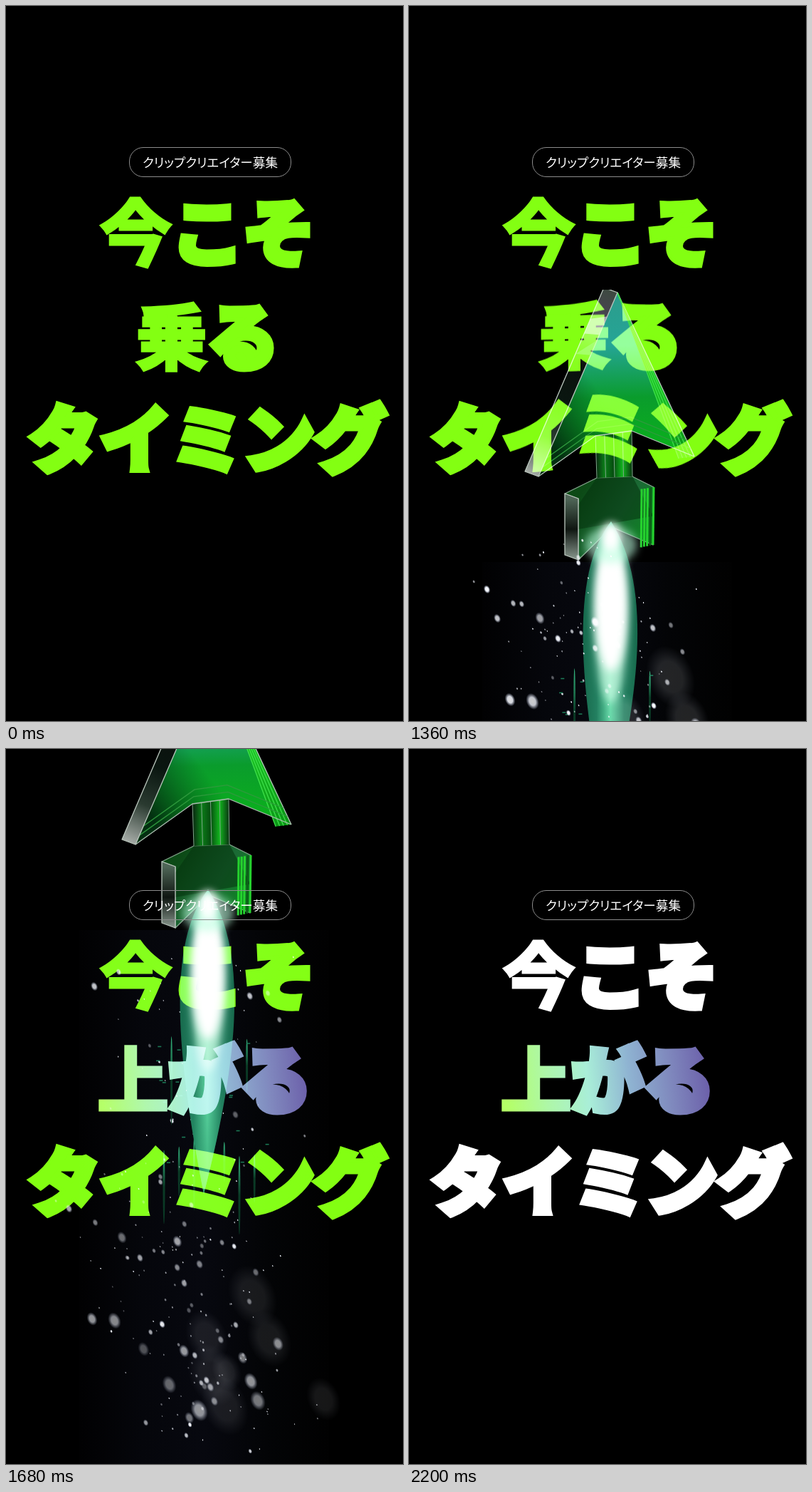
Animation, 558 px wide and 1003 px high, one loop 7200 ms. Source, as an HTML page with a canvas:

```html
<!DOCTYPE html>
<html lang="ja">
<head>
<meta charset="utf-8">
<style>
html, body { margin: 0; width: 100%; height: 100%; overflow: hidden; background: #000; }
canvas { display: block; }
#pill {
  position: absolute; left: 173px; top: 198px; width: 228px; height: 42px;
  box-sizing: border-box; border: 1px solid #8c8c8c; border-radius: 20px;
  color: #fff; font: 500 17.6px/40px "Noto Sans CJK JP", "Noto Sans CJK", sans-serif;
  font-feature-settings: "palt"; text-align: center; white-space: nowrap;
}
</style>
</head>
<body>
<canvas id="stage" width="558" height="1003"></canvas>
<div id="pill">クリップクリエイター募集</div>
<script>
const W = 558, H = 1003, LOOP = 7200, STEP = 40;
const LIME = [131, 255, 18];
const stage = document.getElementById('stage').getContext('2d');
const clamp = v => Math.max(0, Math.min(1, v));
const bell = v => Math.exp(-v * v);

function layer(w, h) {
  const c = document.createElement('canvas');
  c.width = w;
  c.height = h;
  return c.getContext('2d');
}

let seed = 41;
function rnd() {
  seed = (seed * 16807) % 2147483647;
  return seed / 2147483647;
}
const spread = () => rnd() + rnd() + rnd() - 1.5;

function ramp(c, [x0, y0], [x1, y1], ...colors) {
  const g = c.createLinearGradient(x0, y0, x1, y1);
  colors.forEach((col, i) => g.addColorStop(i / (colors.length - 1), col));
  return g;
}

// points are [x, y] pairs
const mix = (a, b, k) => a.map((v, i) => v + (b[i] - v) * k);

function shape(c, pts, fill, line, width = 1) {
  c.beginPath();
  pts.forEach(p => c.lineTo(...p));
  if (fill) {
    c.closePath();
    c.fillStyle = fill;
    c.fill();
  }
  if (line) {
    c.strokeStyle = line;
    c.lineWidth = width;
    c.stroke();
  }
}

function star(c, { x, y, r, alpha }) {
  c.save();
  c.translate(x, y);
  c.rotate(-0.4);
  c.scale(r, r * 1.4);
  const g = c.createRadialGradient(0, 0, 0, 0, 0, 1.4);
  g.addColorStop(0, '#fff');
  g.addColorStop(0.5, '#f4f7ff');
  g.addColorStop(1, 'rgba(200,210,235,0)');
  c.globalAlpha *= alpha;
  c.fillStyle = g;
  c.fillRect(-2, -2, 4, 4);
  c.restore();
}

function drawSky(c) {
  c.fillStyle = ramp(c, [103, 0], [454, 0], '#010102', '#05060b', '#07080f', '#030406', '#010101');
  c.beginPath();
  c.moveTo(103, 382);
  c.lineTo(454, 382);
  c.lineTo(454, 1284);
  c.quadraticCurveTo(290, 1170, 210, 1255);
  c.quadraticCurveTo(150, 1255, 103, 1280);
  c.fill();
  for (let i = 0; i < 150; i++) {
    star(c, { x: 275 + spread() * 130, y: 400 + 840 * rnd(), r: 0.7 + 3 * rnd() ** 5, alpha: 0.3 + 0.7 * rnd() });
  }
}

function drawStreaks(c) {
  for (let i = 0; i < 13; i++) {
    const x = 222 + i * 10.6, y = 400 + 300 * rnd(), half = 20 + 45 * rnd();
    c.fillStyle = ramp(c, [0, y - half], [0, y + half], '#0a3a25', '#35b981', '#0a3a25');
    c.beginPath();
    c.ellipse(x, y + half, 1.5, half, 0, 0, 7);
    c.fill();
  }
  c.fillStyle = '#1c7f59';
  for (let i = 0; i < 26; i++) c.fillRect(205 + 160 * rnd(), 540 + 170 * rnd(), 5, 1.5);
}

function drawArrow(c) {
  const apex = [293, 4], left = [182, 262], right = [401, 234], neckL = [262, 205], neckR = [313, 198];
  const shoulderL = [238, 293], footL = [238, 379], shoulderR = [344, 277], footR = [343, 358];
  const baseL = [264, 264], baseR = [314, 262], fork = [285, 333];
  const back = ([x, y]) => [x - 19, y - 7];
  const side = (a, b, fill) => shape(c, [a, b, back(b), back(a), a], fill, '#bcc8bf', 1.3);
  c.lineJoin = 'round';

  // tail
  shape(c, [shoulderL, back(shoulderL), baseL, baseR, shoulderR, footR, fork, footL],
    ramp(c, shoulderL, footR, '#0c4a16', '#1b6a35', '#0a8a1c'), '#87a78f', 1.3);
  shape(c, [mix(shoulderL, footL, 0.1), baseL, baseR, mix(shoulderR, footR, 0.5), mix(shoulderL, footL, 0.5)], 'rgba(4,50,14,.55)');
  for (let k = 0; k < 0.2; k += 0.04) {
    shape(c, [mix(shoulderR, shoulderL, k), mix(footR, footL, k)], null, k % 0.08 < 0.04 ? '#25d22e' : '#0d5f18', 3);
  }
  side(shoulderL, footL, ramp(c, shoulderL, footL, '#4f6657', '#0f1611', '#8a998f'));

  // neck
  shape(c, [neckL, neckR, baseR, baseL], ramp(c, neckL, [313, 205], '#0a2411', '#0b7e18', '#064d10', '#12b51e', '#0a3b12'));
  for (let k = 0; k <= 1; k += 0.25) shape(c, [mix(neckL, neckR, k), mix(baseL, baseR, k)], null, '#7fa68a');

  // glass head
  const head = [apex, right, neckR, neckL, left];
  shape(c, head, ramp(c, apex, [300, 225], '#2c9c8c', '#25a596', '#0a9c2c', '#0bb01c'));
  shape(c, head, ramp(c, [205, 225], [285, 165], 'rgba(3,40,16,.95)', 'rgba(3,60,30,0)'));
  const inner = mix(right, left, 0.1);
  shape(c, [apex, right, inner], ramp(c, apex, right, '#1c8a2a', '#1bc423', '#0a9416'));
  for (let k = 0; k <= 0.1; k += 0.025) shape(c, [apex, mix(right, left, k)], null, k ? '#3ee04a' : '#b5c6b9', 1.3);
  for (let k = 0; k < 0.12; k += 0.05) {
    shape(c, [right, neckR, neckL, left].map(p => mix(p, apex, k)), null, k ? '#2f9a3d' : '#b0c0b5', 1.3);
  }
  side(apex, left, ramp(c, apex, left, '#3d4a40', '#4d4059', '#0b110d', '#0a1610', '#2a3a30', '#a4aaa5'));
  const glint = k => mix(apex, left, k);
  shape(c, [glint(0.13), glint(0.23), back(glint(0.25)), back(glint(0.17))], 'rgba(200,195,210,.7)');
  shape(c, [glint(0.26), glint(0.34), back(glint(0.36))], 'rgba(85,50,120,.7)');
}

function drawFlame(c) {
  c.save();
  c.beginPath();
  c.moveTo(284, 325);
  c.bezierCurveTo(225, 400, 240, 560, 278, 752);
  c.bezierCurveTo(322, 580, 345, 420, 284, 325);
  c.clip();
  c.fillStyle = ramp(c, [244, 0], [322, 0], '#17694c', '#237f60', '#5fd8a4', '#237f60', '#17694c');
  c.fillRect(230, 320, 100, 440);
  c.fillStyle = ramp(c, [0, 600], [0, 752], 'rgba(35,150,100,0)', 'rgba(35,150,100,.7)');
  c.fillRect(230, 600, 100, 160);
  c.restore();
  c.filter = 'blur(6px)';
  const glow = (y, rx, ry, color) => {
    c.fillStyle = color;
    c.beginPath();
    c.ellipse(284, y, rx, ry, 0, 0, 7);
    c.fill();
  };
  glow(470, 22, 110, 'rgba(215,255,235,.7)');
  glow(440, 23, 95, '#fff');
  glow(358, 36, 26, 'rgba(190,255,225,.6)');
  glow(346, 13, 19, '#fff');
  c.filter = 'none';
}

const rocket = layer(W, 1300);
drawSky(rocket);
drawStreaks(rocket);
drawArrow(rocket);
drawFlame(rocket);

// near stars fan out along a diagonal, larger towards the bottom
const nearStars = Array.from({ length: 110 }, () => {
  const k = rnd();
  return {
    x: 180 + 150 * k + spread() * 130, y: 640 + 370 * k,
    r: 0.8 + (2 + 6 * k) * rnd() ** 5, alpha: 0.4 + 0.6 * rnd()
  };
});
const haze = Array.from({ length: 7 }, () => ({ x: 300 + spread() * 120, y: 810 + 180 * rnd(), r: 14 + 10 * rnd(), alpha: 0.13 }));

// arrow tip: fast in, slow in the middle, fast out, as a curve through [ms, rise]
const RISE = [[0, 0], [200, 404], [360, 535], [600, 855], [800, 1499]];
function tipAt(t) {
  const u = t - 1000;
  return 933 - RISE.reduce((sum, [a, rise]) =>
    sum + RISE.reduce((p, [b]) => a === b ? p : p * (u - b) / (a - b), rise), 0);
}

const words = layer(W, 200);
words.font = '900 100px "Noto Sans CJK JP", "Noto Sans CJK", sans-serif';
words.textAlign = 'center';
words.miterLimit = 3;
const sunset = ramp(words, [135, 115], [425, 85], '#b4ff66', '#aef7a8', '#a9eed8', '#8fb4d2', '#7f88bd', '#6a5ca8');

// one heading line, lifted in the middle by the passing arrow
function drawLine(text, mid, y, fill, tip, alpha = 1) {
  if (!alpha) return;
  words.clearRect(0, 0, W, 200);
  words.fillStyle = words.strokeStyle = fill;
  [...text].forEach((ch, i) => {
    const x = mid + (i - (text.length - 1) / 2) * 100.5;
    words.lineWidth = /\p{Script=Han}/u.test(ch) ? 5 : 11;
    words.strokeText(ch, x, 138);
    words.fillText(ch, x, 138);
  });
  const lift = 25 * bell((y - tip - 170) / 70);
  stage.globalAlpha = alpha;
  if (lift < 0.5) {
    stage.drawImage(words.canvas, 0, y - 100);
  } else {
    for (let x = 0; x < W; x += 2) {
      stage.drawImage(words.canvas, x, 0, 2, 200, x, y - 100 - lift * bell((x - 283) / 65), 2, 200);
    }
  }
  stage.globalAlpha = 1;
}

function render(t) {
  const flying = t >= 1000 && t < 2040;
  const tip = flying ? tipAt(t) : 2000;
  const white = clamp((t - 1840) / 360);
  const main = `rgb(${LIME.map(v => Math.round(v + (255 - v) * white))})`;
  const swap = clamp((t - 1440) / 120);

  stage.fillStyle = '#000';
  stage.fillRect(0, 0, W, H);
  drawLine('今こそ', 283, 318, main, tip);
  drawLine('乗る', 283, 464, main, tip, 1 - swap);
  drawLine('上がる', 279, 464, sunset, tip, swap);
  drawLine('タイミング', 283, 607, main, tip);
  if (!flying) return;

  stage.globalCompositeOperation = 'screen';
  stage.drawImage(rocket.canvas, 0, tip);
  const gap = tip - 78;
  stage.globalAlpha = clamp((t - 1080) / 120) * clamp((1760 - t) / 120);
  for (const s of [...nearStars, ...haze]) star(stage, { ...s, x: s.x + gap * 0.04, y: s.y + gap * 0.33 });
  stage.globalAlpha = 1;
  stage.globalCompositeOperation = 'source-over';
}

function frame() {
  render(Math.floor((performance.now() % LOOP) / STEP) * STEP);
  requestAnimationFrame(frame);
}
frame();
</script>
</body>
</html>
```
